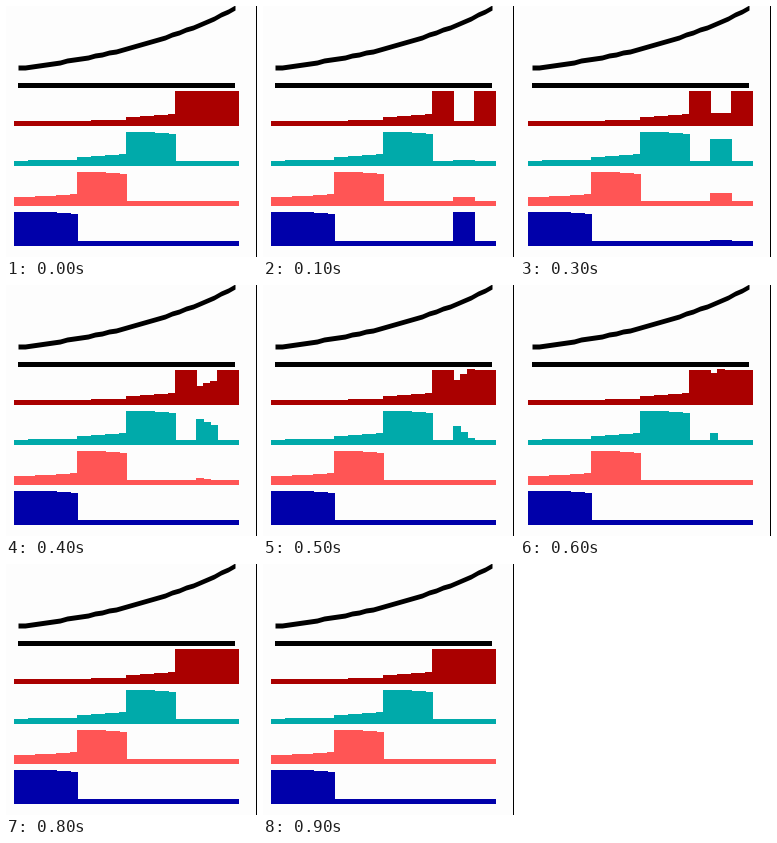
A matplotlib script that plays this animation: 251x251 px, repeating every 1.4 s.

```python
import numpy as np
import matplotlib.pyplot as plt
from matplotlib.animation import FuncAnimation

SIZE, DPI = 251, 64
LEFT, STEP, COUNT = 8, 7, 32
BASE = 5
ZONE_STARTS = [0, 9, 16, 23, COUNT]
RESET_CELLS = range(26, 29)

# Blue, pink, teal, red: each row leads in one zone, and answers a reset
# along a few (frame, height) keys.
COLORS = ["#0000aa", "#ff5555", "#00aaaa", "#aa0000"]
RESPONSES = [
    [(1, 34), (2, 14), (3, 6), (4, BASE)],
    [(1, 9), (2, 30), (3, 13), (4, 7), (5, BASE)],
    [(1, 6), (2, 21), (3, 27), (4, 26), (7, BASE)],
    [(1, BASE), (2, 10), (3, 13), (6.7, 37), (9, 35)],
]


def rest_height(row, cell):
    """Height by how many zones the cell lies before the row's own zone."""
    zone = np.searchsorted(ZONE_STARTS, cell, side="right") - 1
    start, end = ZONE_STARTS[zone:zone + 2]
    s = (cell - start) / (end - start - 1)
    gap = row - zone
    if gap == 0:
        return 35 if row == 3 else 34.5 - 2 * s**3
    if gap == 1:
        return 9 + 3 * s
    if gap == 2:
        return 5.8 + s
    return BASE


def reset_height(row, order, frame):
    """Cells further right settle faster once the first wave has passed."""
    time = frame + 0.4 * order * max(0, frame - 3)
    return np.interp(time, *zip(*RESPONSES[row]))


def heights(row, frame):
    values = [rest_height(row, cell) for cell in range(COUNT)]
    if frame > 0:
        for order, cell in enumerate(RESET_CELLS):
            values[cell] = reset_height(row, order, frame)
    return np.floor(values)


fig = plt.figure(figsize=(SIZE / DPI, SIZE / DPI), dpi=DPI, facecolor="#fdfdfd")
ax = fig.add_axes([0, 0, 1, 1])
ax.axis("off")

flat = dict(lw=0, antialiased=False)
x = np.linspace(12, 229, COUNT)
curve_top = 77 - np.round(17.5 * (78 / 17.5) ** np.linspace(0, 1, COUNT))
ax.fill_between(x, curve_top, curve_top + 5, color="black", **flat)
ax.fill_between([12, 229], 77, 82, color="black", **flat)
ax.fill_between([250, 251], 0, SIZE, color="black", **flat)

lefts = LEFT + STEP * np.arange(COUNT)
bottoms = [240 - 40 * row for row in range(4)]
rows = [
    ax.bar(lefts, BASE, width=STEP + 1, bottom=bottom - BASE, align="edge",
           color=color, **flat)
    for bottom, color in zip(bottoms, COLORS)
]
ax.set_xlim(0, SIZE)
ax.set_ylim(SIZE, 0)


def draw(frame):
    for row, bars in enumerate(rows):
        for bar, height in zip(bars, heights(row, frame)):
            bar.set_y(bottoms[row] - height)
            bar.set_height(height)
    return [bar for bars in rows for bar in bars]


anim = FuncAnimation(fig, draw, frames=14, interval=100, repeat=True, repeat_delay=0)
plt.show()
```
